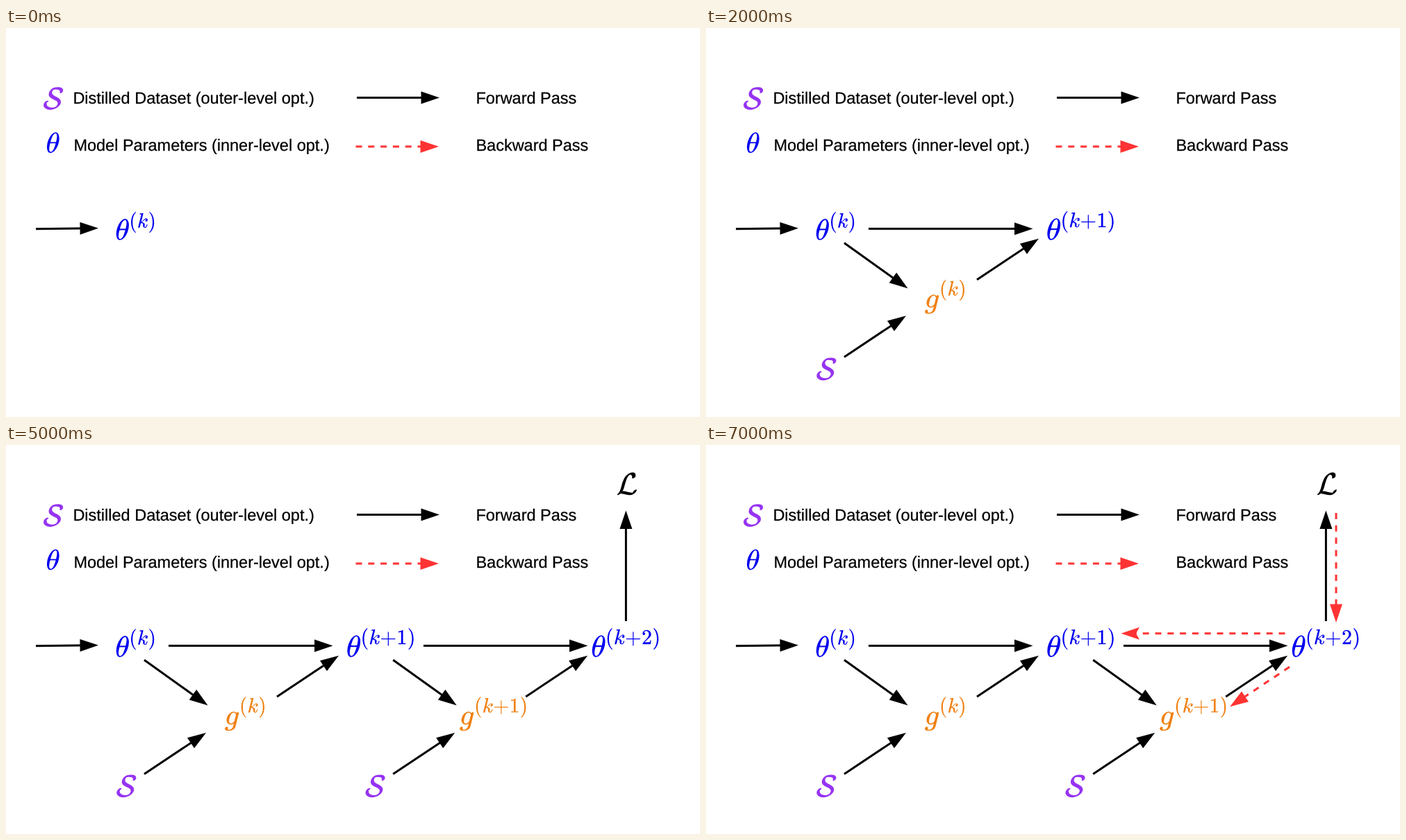
Animation, 999 px wide and 561 px high, one loop 8 s. Source, as an HTML page:

```html
<!DOCTYPE html>
<html lang="en">
<head>
<meta charset="utf-8">
<title>Unrolled optimisation</title>
<style>
html, body { margin: 0; width: 100%; height: 100%; overflow: hidden; background: #fff; }
svg { display: block; width: 100vw; height: 100vh; }
text {
  font: 23.5px "Liberation Sans", Arial, sans-serif;
  text-rendering: geometricPrecision;
  stroke: #000;
  stroke-width: 0.25px;
}
</style>
</head>
<body>
<svg id="stage" viewBox="0 0 999 561"></svg>
<script>
const NS = 'http://www.w3.org/2000/svg';
const stage = document.getElementById('stage');
const BLACK = '#000', RED = '#ff3333', BLUE = '#0000f0', ORANGE = '#f08010', PURPLE = '#9633f2';
const DASH = '9 8.8';
const LOOP = 8000, STEP = 1000;

// Math glyphs: advance width and outline, 1000 units per em, y up
const glyphs = {
  theta: [469, 'M35 200Q35 302 74 415T180 610T319 704Q320 704 327 704T339 705Q393 701 423 656Q462 596 462 495Q462 380 417 261T302 66T168 -10H161Q125 -10 99 10T60 63T41 130T35 200ZM383 566Q383 668 330 668Q294 668 260 623T204 521T170 421T157 371Q206 370 254 370L351 371Q352 372 359 404T375 484T383 566ZM113 132Q113 26 166 26Q181 26 198 36T239 74T287 161T335 307L340 324H145Q145 321 136 286T120 208T113 132Z'],
  g: [497, 'M311 43Q296 30 267 15T206 0Q143 0 105 45T66 160Q66 265 143 353T314 442Q361 442 401 394L404 398Q406 401 409 404T418 412T431 419T447 422Q461 422 470 413T480 394Q480 379 423 152T363 -80Q345 -134 286 -169T151 -205Q10 -205 10 -137Q10 -111 28 -91T74 -71Q89 -71 102 -80T116 -111Q116 -121 114 -130T107 -144T99 -154T92 -162L90 -164H91Q101 -167 151 -167Q189 -167 211 -155Q234 -144 254 -122T282 -75Q288 -56 298 -13Q311 35 311 43ZM384 328L380 339Q377 350 375 354T369 368T359 382T346 393T328 402T306 405Q262 405 221 352Q191 313 171 233T151 117Q151 38 213 38Q269 38 323 108L331 118L384 328Z'],
  S: [642, 'M554 512Q536 512 536 522Q536 525 539 539T542 564Q542 588 528 604Q515 616 482 625T410 635Q374 635 349 624T312 594T295 561T290 532Q290 505 303 482T342 442T378 419T409 404Q435 391 451 383T494 357T535 323T562 282T574 231Q574 133 464 56T220 -22Q138 -22 78 21T18 123Q18 184 61 227T156 274Q178 274 178 263Q178 260 177 258Q172 247 164 239T151 227T136 218L127 213Q118 196 118 163Q120 112 165 82T278 48Q362 48 416 84T472 182Q472 214 453 238Q434 261 404 276T339 308T273 344T212 396T185 473Q185 560 262 632T480 705Q560 705 602 680T645 606Q645 570 618 541T554 512Z'],
  L: [690, 'M47 -22Q32 -22 32 -11Q32 -1 56 24T83 55Q113 96 138 172T180 320T234 473T323 609Q364 649 419 677T531 705Q559 705 578 696T604 671T615 645T618 623V611Q618 582 615 571T598 548Q581 531 558 520T518 509Q503 509 503 520Q503 523 505 536T507 560Q507 590 488 610T452 630Q423 630 410 617Q367 578 333 492T271 301T233 170Q211 123 204 112L198 103L224 102Q281 102 369 79T509 52H523Q535 64 544 87T579 128Q616 152 641 152Q656 152 656 142Q656 101 588 40T433 -22Q381 -22 289 1T156 28L141 29L131 20Q111 5 87 -8T47 -22Z'],
  k: [521, 'M121 647Q121 657 125 670T137 683Q138 683 209 688T282 694Q294 694 294 686Q294 679 244 477Q194 279 194 272Q213 282 223 291Q247 309 292 354T362 415Q402 442 438 442Q468 442 485 423T503 369Q503 344 496 327T477 302T456 291T438 288Q418 288 406 299T394 328Q394 353 410 369T442 390L458 393Q446 405 434 405H430Q398 402 367 380T294 316T228 255Q230 254 243 252T267 246T293 238T320 224T342 206T359 180T365 147Q365 130 360 106T354 66Q354 26 381 26Q429 26 459 145Q461 153 479 153H483Q499 153 499 144Q499 139 496 130Q455 -11 378 -11Q333 -11 305 15T277 90Q277 108 280 121T283 145Q283 167 269 183T234 206T200 217T182 220H180Q168 178 159 139T145 81T136 44T129 20T122 7T111 -2Q98 -11 83 -11Q66 -11 57 -1T48 16Q48 26 85 176T158 471L195 616Q196 629 188 632T149 637H144Q134 637 131 637T124 640T121 647Z'],
  '(': [389, 'M94 250Q94 319 104 381T127 488T164 576T202 643T244 695T277 729T302 750H319Q333 750 333 741Q333 738 316 720T275 667T226 581T184 443T167 250T184 58T225 -81T274 -167T316 -220T333 -241Q333 -250 318 -250H302L274 -226Q180 -141 137 -14T94 250Z'],
  ')': [389, 'M60 749L64 750H86L114 726Q208 641 251 514T294 250Q294 182 284 119T261 12T224 -76T186 -143T145 -194T113 -227T90 -246L86 -250H74Q66 -250 63 -250T58 -247T55 -238Q56 -237 66 -225Q221 -64 221 250T66 725Q56 737 55 738Q55 746 60 749Z'],
  '+': [778, 'M70 270H369V568Q376 583 389 583Q402 583 409 568V270H707Q722 262 722 250T707 230H409V-68Q401 -82 389 -82Q375 -82 369 -68V230H70Q56 237 56 250T70 270Z'],
  1: [500, 'M213 578L200 573Q186 568 160 563T102 556H83V602H102Q149 604 189 617T245 641T273 663Q275 666 285 666Q294 666 302 660V361L303 61Q310 54 315 52T339 48T401 46H427V0H416Q395 3 257 3Q121 3 100 0H88V46H136Q190 46 202 49T213 61V578Z'],
  2: [500, 'M109 429Q82 429 66 447T50 491Q50 562 103 614T235 666Q326 666 387 610T449 465Q449 422 429 383T381 315T301 241Q265 210 201 149L142 93L218 92Q375 92 385 97Q392 99 409 186V189H449V186Q448 183 436 95T421 3V0H50V31Q50 38 56 46T86 81Q115 113 136 137Q145 147 170 174T204 211T233 244T261 278T284 308T305 340T320 369T333 401T340 431T343 464Q343 527 309 573T212 619Q179 619 154 602T119 569T109 550Q109 549 114 549Q132 549 151 535T170 489Q170 464 154 447T109 429Z']
};

function add(parent, tag, attrs) {
  const el = document.createElementNS(NS, tag);
  for (const key in attrs) el.setAttribute(key, attrs[key]);
  return parent.appendChild(el);
}

const layers = Array.from({ length: LOOP / STEP }, () => add(stage, 'g', {}));

function glyph(layer, name, x, y, size, color) {
  const [width, d] = glyphs[name], s = size / 1000;
  add(layers[layer], 'path', {
    d, fill: color, transform: `translate(${x} ${y}) scale(${s} ${-s})`
  });
  return x + width * s;
}

// Symbol with a raised exponent
function power(layer, name, exponent, x, y, size, color) {
  x = glyph(layer, name, x, y, size, color);
  for (const c of exponent) x = glyph(layer, c, x, y - size * 0.413, size * 0.7, color);
}

function label(str, x, y) {
  add(layers[0], 'text', { x, y }).textContent = str;
}

function arrow(layer, x1, y1, x2, y2, color = BLACK, dash = 'none', notch = 0) {
  const len = Math.hypot(x2 - x1, y2 - y1), head = 26.5, half = 9;
  const angle = Math.atan2(y2 - y1, x2 - x1) * 180 / Math.PI;
  const g = add(layers[layer], 'g', { transform: `translate(${x1} ${y1}) rotate(${angle})` });
  add(g, 'path', {
    d: `M0 0H${len - head + notch + 1}`, fill: 'none',
    stroke: color, 'stroke-width': 3, 'stroke-dasharray': dash
  });
  add(g, 'path', {
    d: `M${len} 0L${len - head} ${-half}L${len - head + notch} 0L${len - head} ${half}Z`, fill: color
  });
}

// Legend and first state
glyph(0, 'S', 53.2, 117, 45, PURPLE);
glyph(0, 'theta', 57.5, 179.8, 41.5, BLUE);
label('Distilled Dataset (outer-level opt.)', 96.4, 109);
label('Model Parameters (inner-level opt.)', 97.4, 176.8);
label('Forward Pass', 676.4, 109);
label('Backward Pass', 676.4, 176.8);
arrow(0, 505, 100.5, 624, 100.5);
arrow(0, 503.5, 171, 623, 171, RED, DASH);
arrow(0, 43, 289.8, 133, 288.7);
power(0, 'theta', '(k)', 157.2, 305.4, 42.7, BLUE);

// Two unrolled inner steps
for (const [layer, dx] of [[1, 0], [3, 358.2]]) {
  glyph(layer, 'S', 158.4 + dx, 507.2, 45, PURPLE);
  arrow(layer, 199 + dx, 310, 290.5 + dx, 375.5);
  arrow(layer, 199 + dx, 474.5, 288 + dx, 415);
  arrow(layer + 1, 390 + dx, 363, 479 + dx, 303.7);
}
power(1, 'g', '(k)', 314.6, 403.3, 42.8, ORANGE);
arrow(2, 234, 289.5, 470.5, 289.5);
power(2, 'theta', '(k+1)', 489.8, 305.4, 43.9, BLUE);
power(3, 'g', '(k+1)', 652.7, 403.3, 42.8, ORANGE);
arrow(4, 601, 289.5, 837.5, 289.5);
power(4, 'theta', '(k+2)', 842.2, 305.4, 44, BLUE);

// Loss and gradients
glyph(5, 'L', 878.5, 71.2, 45, BLACK);
arrow(5, 892.4, 254, 892.4, 94.5);
arrow(6, 907, 98, 907, 256, RED, DASH);
arrow(7, 833.5, 271.8, 597.5, 271.8, RED, DASH, 5);
arrow(7, 840, 320, 754, 377.5, RED, DASH);

function draw(time) {
  const step = Math.floor(time % LOOP / STEP);
  layers.forEach((g, i) => g.setAttribute('visibility', i <= step ? 'visible' : 'hidden'));
}

let start;
function tick(now) {
  start ??= now;
  draw(now - start);
  requestAnimationFrame(tick);
}
draw(0);
requestAnimationFrame(tick);
</script>
</body>
</html>
```
